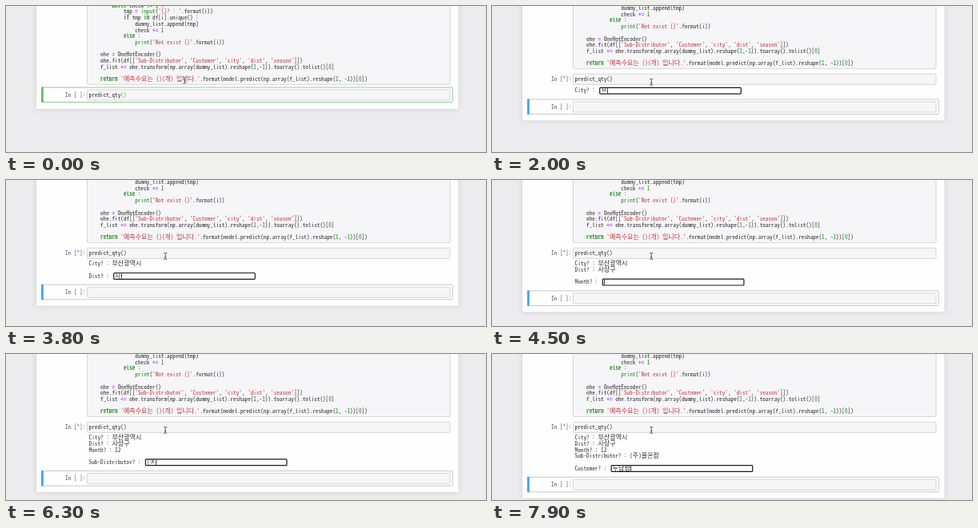
An HTML page that plays this animation: 600x183 px, repeating every 8000 ms.

```html
<!DOCTYPE html>
<html lang="ko">
<head>
<meta charset="utf-8">
<title>Notebook prediction</title>
<style>
  html, body { margin: 0; width: 100%; height: 100%; overflow: hidden; background: #ecebed; }
  svg { display: block; width: 600px; height: 183px; }
  text { white-space: pre; }
  #page { fill: #fefefe; filter: drop-shadow(0 0 3px rgba(87, 87, 87, .2)); }
</style>
</head>
<body>
<svg viewBox="0 0 600 183" xmlns="http://www.w3.org/2000/svg">
  <rect id="page" x="38" y="-30" width="527.5"/>
  <g id="code"></g>
  <g id="live"></g>
  <path id="mouse" d="M-2-4Q-.3-4 0-3.2Q.3-4 2-4M0-3.4V3.4M-2 4Q-.3 4 0 3.2Q.3 4 2 4M-1 1.2H1" fill="none" stroke="#444" stroke-width=".9"/>
</svg>
<script>
const LOOP = 8000, RUN = 1800, SCROLL = -19.7, BLINK = 300;
const LEFT = 103.6, LINE = 7.7, CELL_W = 3.61, WIDE_W = 7.4;
const MONO = "'Noto Sans Mono CJK KR', 'Noto Sans Mono', 'Liberation Mono', monospace";
const HANGUL = "'Noto Sans CJK KR', 'Noto Sans Mono CJK KR', 'Noto Sans CJK', sans-serif";
const INK = '#2e2e2e', GREEN = '#128a12', RED = '#c2343c';
const $ = id => document.getElementById(id);

// Font size at which one sample character has the wanted advance
const pen = document.createElement('canvas').getContext('2d');
function sizeFor(family, sample, advance) {
  pen.font = `100px ${family}`;
  return 100 * advance / pen.measureText(sample).width;
}
const monoSize = sizeFor(MONO, '0', CELL_W);
const wideSize = sizeFor(HANGUL, '가', WIDE_W);

const isWide = c => c >= '\u3131' && c <= '\ud7a3';
const widthOf = s => [...s].reduce((w, c) => w + (isWide(c) ? WIDE_W : CELL_W), 0);

// y is the middle of the line
function label(s, x, y, fill = INK, bold = false) {
  let out = '';
  for (const run of s.match(/[\u3131-\ud7a3]+|[^\u3131-\ud7a3]+/g) || []) {
    const wide = isWide(run[0]);
    out += `<text x="${x.toFixed(2)}" y="${(y + 2.3).toFixed(2)}" fill="${fill}"` +
      ` font-family="${wide ? HANGUL : MONO}" font-size="${wide ? wideSize : monoSize}"` +
      `${bold ? ' font-weight="700"' : ''}>${run}</text>`;
    x += widthOf(run);
  }
  return out;
}

const box = (x, y, w, h, fill, stroke, sw = .9, r = 1) =>
  `<rect x="${x}" y="${y}" width="${w}" height="${h}" rx="${r}" fill="${fill}" stroke="${stroke}" stroke-width="${sw}"/>`;
const bar = (x, y, w, h, fill) => `<rect x="${x}" y="${y}" width="${w}" height="${h}" fill="${fill}"/>`;
const inputArea = (y, h) => box(101.5, y, 453.5, h, '#f6f5f7', '#d3d2d4');

const SOURCE = `        while check != 1 :
            tmp = input('{}? : '.format(i))
            if tmp in df[i].unique() :
                dummy_list.append(tmp)
                check += 1
            else :
                print('Not exist {}'.format(i))

    ohe = OneHotEncoder()
    ohe.fit(df[['Sub-Distributor', 'Customer', 'city', 'dist', 'season']])
    f_list += ohe.transform(np.array(dummy_list).reshape(1,-1)).toarray().tolist()[0]

    return '예측수요는 {}(개) 입니다.'.format(model.predict(np.array(f_list).reshape(1, -1))[0])`;

const RULES = [
  [/^'/, RED],
  [/^(while|if|in|else|return)$/, '#2a9a2a', true],
  [/^(input|print)$/, GREEN],
  [/^\d/, GREEN],
  [/^[=+!-]/, '#b04cf5', true]
];

function highlight(line, y) {
  let x = LEFT, out = '';
  for (const token of line.match(/'[^']*'|\w+|[=+!-]+|\s+|./g) || []) {
    const [, fill, bold] = RULES.find(r => r[0].test(token)) || [];
    if (token.trim()) out += label(token, x, y, fill, bold);
    x += widthOf(token);
  }
  return out;
}

$('code').innerHTML = inputArea(-20, 118.3) +
  SOURCE.split('\n').map((s, i) => highlight(s, -.6 + i * LINE)).join('');

// Keystrokes of a Korean keyboard: initial, vowel, final
const INITIALS = 'ㄱㄲㄴㄷㄸㄹㅁㅂㅃㅅㅆㅇㅈㅉㅊㅋㅌㅍㅎ';
function strokes(start, text, step, before = '') {
  const keys = [];
  const press = s => keys.push({ at: start + keys.length * step, text: s });
  for (const c of text) {
    if (c >= '가') {
      const n = c.charCodeAt(0) - 0xac00, final = n % 28;
      press(before + INITIALS[Math.floor(n / 588)]);
      if (final) press(before + String.fromCharCode(0xac00 + n - final));
    }
    press(before += c);
  }
  return keys;
}

const FIELDS = [
  { ask: 'City? : ', from: RUN, to: 3200, keys: strokes(1950, '부산광역시', 75) },
  { ask: 'Dist? : ', from: 3200, to: 4500, keys: strokes(3600, '사상구', 120) },
  { ask: 'Month? : ', from: 4500, to: 5450, keys: strokes(5100, '12', 200) },
  { ask: 'Sub-Distributor? : ', from: 5450, to: 7200,
    keys: [...strokes(5900, '(', 0), ...strokes(6260, '주)율온팜', 72, '(')] },
  { ask: 'Customer? : ', from: 7200, to: LOOP, keys: strokes(7350, '두담팜', 75) }
];

const fieldAt = t => FIELDS.findIndex(f => t < f.to);
const promptY = n => n ? 112.5 + n * LINE : 106;

function cell(y, mark, edge, accent) {
  const frame = accent
    ? box(44.5, y, 513.7, 18.6, '#fefefe', edge) + bar(44, y - .4, 2.8, 19.4, accent) : '';
  return frame + inputArea(y + 2.9, 13.2) + label(`In [${mark}]:`, 74, y + 9.4, '#4c5270');
}

function editing(t) {
  const y = 111.4, end = LEFT + widthOf('predict_qty');
  const caret = Math.floor(t / BLINK) % 2;
  return cell(102, ' ', '#7fca83', '#66bb6a') + label('predict_qty', LEFT, y) +
    label('()', end, y, '#2fbf2f') +
    (caret ? bar(150.4, 107.3, .9, 8.2, '#000') : '');
}

function asking(t) {
  const n = fieldAt(t), field = FIELDS[n], y = promptY(n);
  const typed = field.keys.filter(k => k.at <= t).pop() || { at: field.from, text: '' };
  const x = LEFT + widthOf(field.ask) + 2.2;
  const caret = Math.floor((t - typed.at) / BLINK) % 2 === 0;
  return cell(102 + SCROLL, '*') + label('predict_qty()', LEFT, 111.3 + SCROLL) +
    FIELDS.slice(0, n).map((f, i) =>
      label(f.ask + f.keys[f.keys.length - 1].text, LEFT, 105 + i * LINE)).join('') +
    label(field.ask, LEFT, y) +
    box(x, y - 3.7, 176.6, 7.8, '#fff', '#1a1a1a', 1.2) +
    label(typed.text, x + 1.5, y + .1) +
    (caret ? bar(x + 1.9 + widthOf(typed.text), y - 2.9, .8, 6.2, '#000') : '') +
    cell(y + 11, ' ', '#c2c2c6', '#42a5f5');
}

const pageBottom = t => t < RUN ? 129 : promptY(fieldAt(t)) + 37.4;

let shown = '';
function draw(t) {
  const live = t < RUN ? editing(t) : asking(t);
  if (live !== shown) $('live').innerHTML = shown = live;
  $('page').setAttribute('height', pageBottom(t) + 30);
  $('code').setAttribute('transform', `translate(0 ${t < RUN ? 0 : SCROLL})`);
  const p = Math.min(t / 600, 1), ease = p * p * (3 - 2 * p);
  $('mouse').setAttribute('transform', `translate(${223.5 - 24.3 * ease} ${93 + 2.4 * ease})`);
}

const begin = performance.now();
function tick() {
  draw((performance.now() - begin) % LOOP);
  requestAnimationFrame(tick);
}
tick();
</script>
</body>
</html>
```
